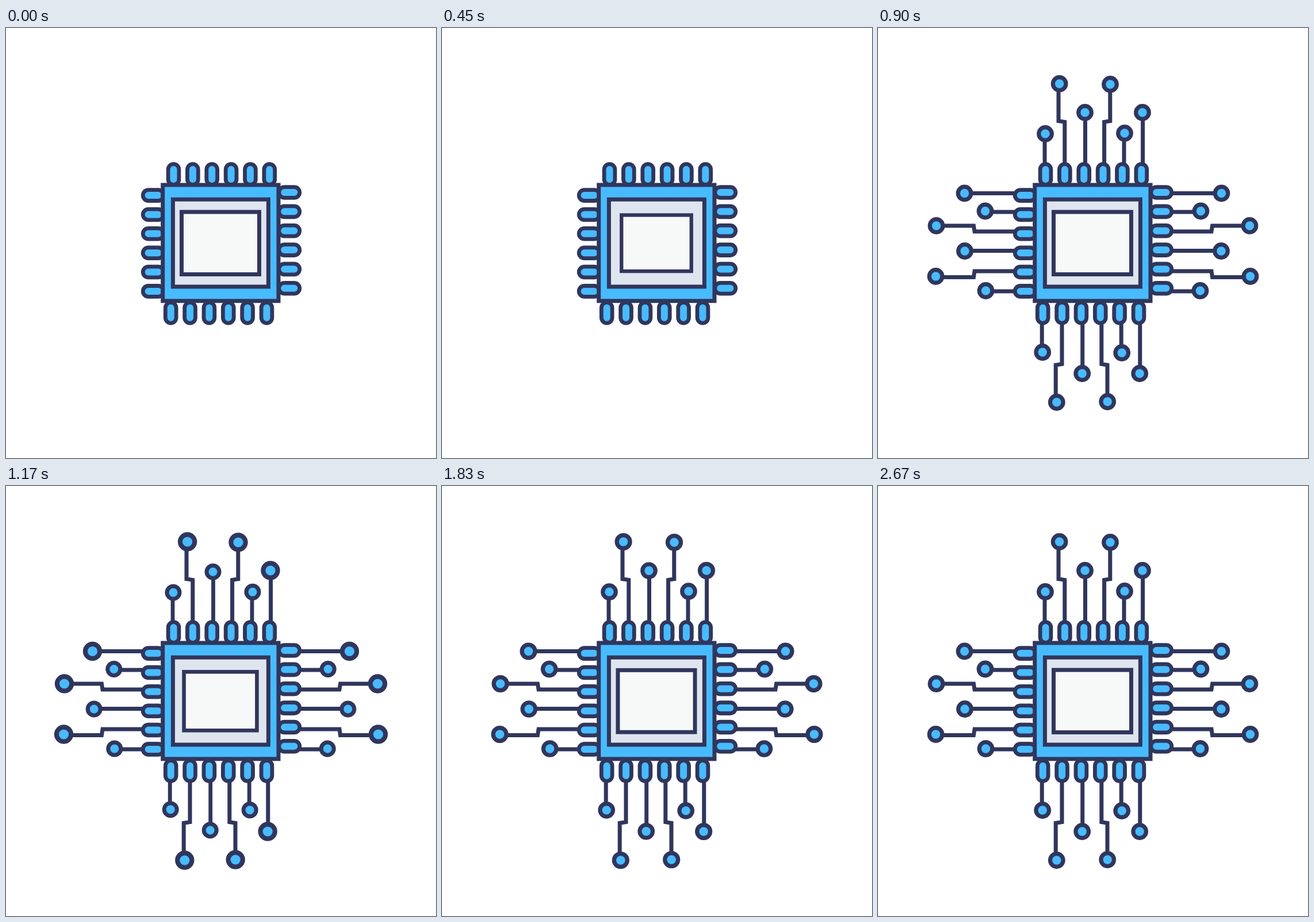
These frames come from a looping animation (748 px wide and 748 px high, 2700 ms). An HTML page:

```html
<!DOCTYPE html>
<html lang="en">
<head>
<meta charset="utf-8">
<title>Microchip</title>
<style>
  html, body { margin: 0; width: 100%; height: 100%; overflow: hidden; background: #fff; }
  svg { display: block; width: 100%; height: 100%; }
</style>
</head>
<body>
<svg id="stage" viewBox="0 0 748 748"></svg>
<script>
const LOOP = 2700, STEP = 30, BEAT = 900, SIZE = 748, EDGE = 237;
const INK = '#30365c', BLUE = '#48bbff', PALE = '#dfe5ef', WHITE = '#f7f9f8';
const stage = document.getElementById('stage');

function add(parent, tag, attrs = {}) {
  const el = document.createElementNS('http://www.w3.org/2000/svg', tag);
  for (const key in attrs) el.setAttribute(key, attrs[key]);
  return parent.appendChild(el);
}

function box(parent, x, y, width, height, fill, rx = 0, line = 7) {
  return add(parent, 'rect', {
    x, y, width, height, rx, fill, stroke: INK, 'stroke-width': line
  });
}

const scaleAbout = (x, y, s) =>
  `translate(${x} ${y}) scale(${s}) translate(${-x} ${-y})`;

// Each trace: lane, node across, node along, then lane after the jog.
const upTraces = [
  [290, 291, 184],
  [324.8, 315.6, 97, 314],
  [360.5, 360, 147],
  [393.6, 404, 98, 403.8],
  [428, 429, 183],
  [460.6, 460, 147]
];
const sideTraces = [
  [287.5, 287.5, 150.5],
  [320, 318.5, 186.5],
  [354, 344, 101.5, 344],
  [387.5, 388, 151],
  [423, 432, 100.5, 433.5],
  [458, 457, 187.5]
];
// Traces that end in a swelling node; the others shrink towards their pin.
const swelling = { up: [1, 3, 5], side: [0, 2, 4] };

const traces = add(stage, 'g');
const pulses = [];

function addTrace([lane, across, along, lane2], swells, place, jog) {
  const g = add(traces, 'g');
  const points = [place(lane, EDGE + 3)];
  if (lane2) points.push(place(lane, jog + 0.8), place(lane2, jog - 0.8));
  points.push(place(lane2 || lane, along));
  add(g, 'polyline', {
    points: points.join(' '), fill: 'none', stroke: INK, 'stroke-width': 7
  });
  const [cx, cy] = place(across, along);
  const node = add(g, 'circle', {
    cx, cy, r: 11.3, fill: BLUE, stroke: INK, 'stroke-width': 7.2
  });
  pulses.push(swells
    ? { el: node, at: [cx, cy], gain: 0.2 }
    : { el: g, at: place(lane, EDGE), gain: -0.042 });
}

const places = {
  up: [(a, b) => [a, b], (a, b) => [a - 4.8, SIZE - b]],
  side: [(a, b) => [b, a], (a, b) => [SIZE - b, a]]
};
for (const place of places.up)
  upTraces.forEach((t, i) => addTrace(t, swelling.up.includes(i), place, 162.6));
for (const place of places.side)
  sideTraces.forEach((t, i) => addTrace(t, swelling.side.includes(i), place, 167.2));

const chip = add(stage, 'g');
function addPin(cx, cy, upright) {
  const w = upright ? 18.8 : 36, h = upright ? 36 : 18.8;
  box(chip, cx - w / 2, cy - h / 2, w, h, BLUE, 9.4, 6.8);
}
for (let i = 0; i < 6; i++) {
  const d = i * 33.36;
  addPin(291.5 + d, 254.7, true);
  addPin(286.7 + d, 495.3, true);
  addPin(256.2, 291.1 + d, false);
  addPin(492.8, 286 + d, false);
}
box(chip, 272.7, 273, 201.3, 201.8, BLUE);
box(chip, 290.4, 298.2, 166, 151.8, PALE);
const core = box(chip, 305.5, 320, 135, 108.5, WHITE);
pulses.push({ el: core, at: [373, 374.2], gain: -0.1 });

// Linear there-and-back; the last beat comes to rest on the final step.
function beat(t) {
  if (t >= LOOP - BEAT / 2) return (LOOP - STEP - t) / (BEAT / 2 - STEP);
  return 1 - Math.abs((t % BEAT) / (BEAT / 2) - 1);
}

// Swing: 0 to 5, to -5, back to 0 degrees in thirds of a beat.
function swing(t) {
  const u = t / 300;
  if (u < 1) return 5 * u;
  if (u < 2) return 5 - 10 * (u - 1);
  return u < 3 ? 5 * (u - 3) : 0;
}

function draw(t) {
  const b = beat(t);
  chip.setAttribute('transform', `rotate(${swing(t)} 374 374)`);
  traces.setAttribute('visibility', t < BEAT ? 'hidden' : 'visible');
  for (const { el, at, gain } of pulses)
    el.setAttribute('transform', scaleAbout(...at, 1 + gain * b));
}

const start = performance.now();
function tick() {
  const t = (performance.now() - start + 1) % LOOP;
  draw(Math.floor(t / STEP) * STEP);
  requestAnimationFrame(tick);
}
tick();
</script>
</body>
</html>
```
